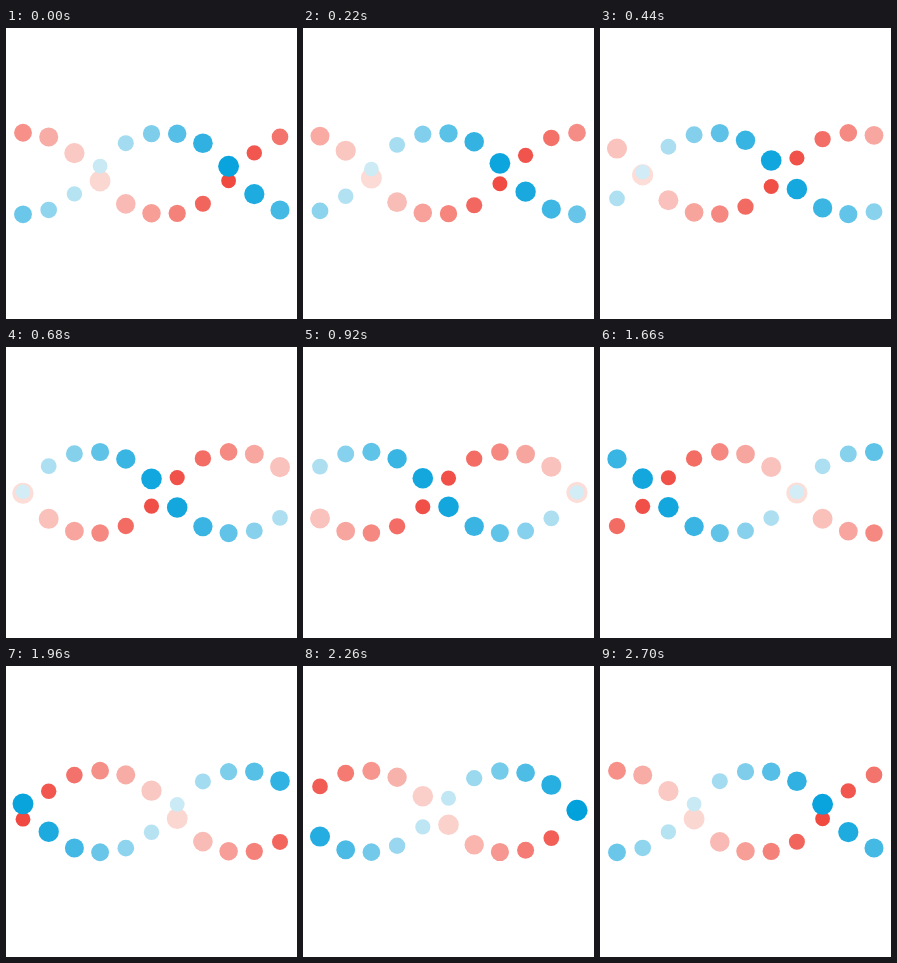
Recreate the animation shown at these times as an HTML page. Size 291 by 291 pixels, loop 2720 ms.

```html
<!DOCTYPE html>
<html lang="en">
<head>
<meta charset="utf-8">
<title>Double helix</title>
<style>
  html, body { margin: 0; width: 100%; height: 100%; overflow: hidden; background: #fff; }
  svg { display: block; width: 100%; height: 100%; }
</style>
</head>
<body>
<svg id="stage" viewBox="0 0 291 291"></svg>
<script>
const LOOP = 2720, TURN = 2700, COLS = 11;
const LEFT = 17, PITCH = 25.7, MID = 145.5, SWING = 40.8;
const R_MIN = 7.25, R_MAX = 10.6;
const RED = { vivid: [239, 66, 57], pale: [252, 222, 217] };
const BLUE = { vivid: [0, 160, 220], pale: [211, 237, 246] };

const stage = document.getElementById('stage');
const mix = (a, b, k) => a + (b - a) * k;
const blend = (a, b, k) => `rgb(${a.map((v, i) => Math.round(mix(v, b[i], k)))})`;

// 1 at the start of a turn, 0 halfway through, linear between
const triangle = turn => Math.abs(1 - 2 * (turn - Math.floor(turn)));

// cubic-bezier(.5, 0, .5, 1)
function ease(x) {
  let lo = 0, hi = 1;
  for (let i = 0; i < 24; i++) {
    const s = (lo + hi) / 2;
    if (1.5 * s - 1.5 * s * s + s * s * s < x) lo = s; else hi = s;
  }
  return lo * lo * (3 - 2 * lo);
}

function addDot(col) {
  const dot = document.createElementNS('http://www.w3.org/2000/svg', 'circle');
  dot.setAttribute('cx', LEFT + col * PITCH);
  stage.appendChild(dot);
  return dot;
}

const columns = Array.from({ length: COLS }, (_, i) => ({ red: addDot(i), blue: addDot(i) }));

function place(dot, y, r, fill) {
  dot.setAttribute('cy', y.toFixed(3));
  dot.setAttribute('r', r.toFixed(3));
  dot.setAttribute('fill', fill);
}

function draw(ms) {
  columns.forEach(({ red, blue }, i) => {
    const turn = i / COLS + ms / TURN;
    const dy = SWING * (2 * ease(triangle(turn)) - 1);
    const near = triangle(turn + 0.25);
    place(red, MID - dy, mix(R_MAX, R_MIN, near), blend(RED.pale, RED.vivid, near));
    place(blue, MID + dy, mix(R_MIN, R_MAX, near), blend(BLUE.pale, BLUE.vivid, near));
  });
}

const start = performance.now();
function tick() {
  draw((performance.now() - start) % LOOP);
  requestAnimationFrame(tick);
}
tick();
</script>
</body>
</html>
```
